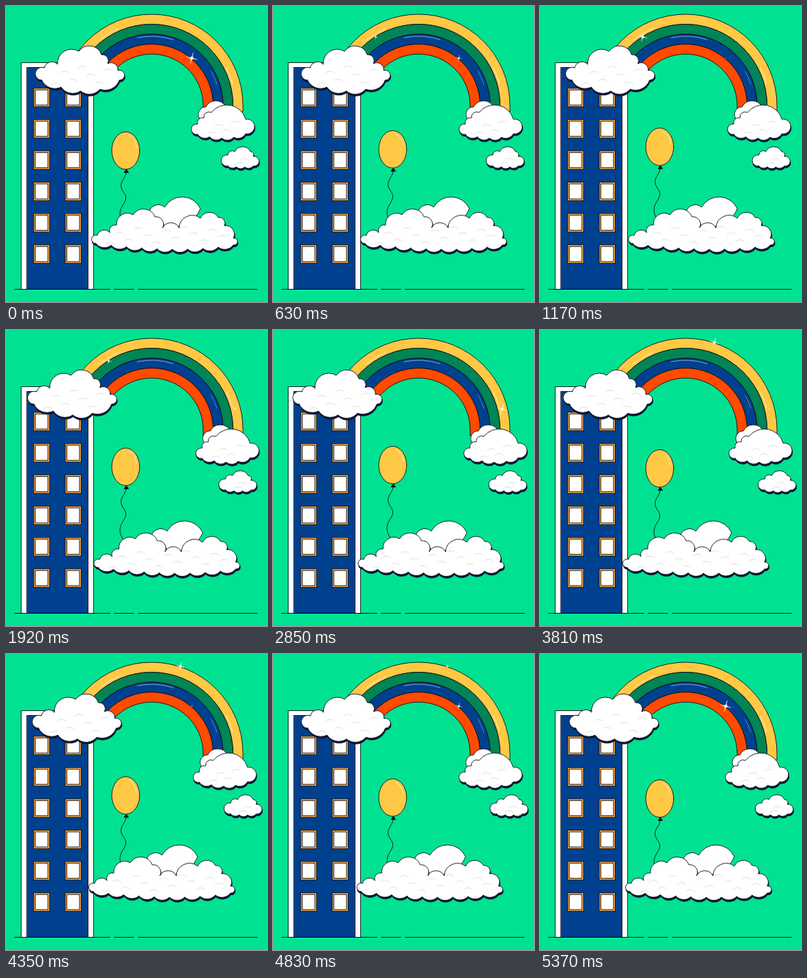
Recreate the animation shown at these times as an HTML page. Size 380 by 431 pixels, loop 5.4 s.

```html
<!DOCTYPE html>
<html lang="en">
<head>
<meta charset="utf-8">
<title>Rainbow and clouds</title>
<style>
html, body { margin: 0; width: 100%; height: 100%; overflow: hidden; background: #00e292; }
svg { display: block; width: 380px; height: 431px; }
</style>
</head>
<body>
<svg id="stage" viewBox="0 0 380 431" fill="none" stroke="#0a0a14" stroke-width=".9" stroke-linecap="round" stroke-linejoin="round"></svg>
<script>
const LOOP = 5400, stage = document.getElementById('stage');
const WHITE = '#fff', NAVY = '#00418f', SHADE = '#0b1836', YELLOW = '#ffc845', SHINE = '#fff2cf';

// Radius / chord of each kind of bump; a negative one goes the longer way round.
const LOBE = .56, TIP = -.51, SCALLOP = .7;

const arcTo = ([x0, y0], [x, y], k) => {
  const r = Math.hypot(x - x0, y - y0) * Math.abs(k);
  return `A${r} ${r} 0 ${k < 0 ? 1 : 0} 1 ${x} ${y}`;
};

// Closed outline of bumps; kind(i) shapes the one that leaves point i.
const puffs = (pts, kind = () => LOBE) => `M${pts[0]}` +
  pts.map((p, i) => arcTo(p, pts[(i + 1) % pts.length], kind(i))).join('') + 'Z';

// The underside sags between the tips, deepest a little right of the middle.
const belly = ([x0, y0], [x1, y1], count, sag) =>
  Array.from({ length: count - 1 }, (_, i) => {
    const u = (i + 1) / count;
    return [x0 + (x1 - x0) * u, y0 + (y1 - y0) * u + sag * Math.sin(Math.PI * u ** .85)];
  });

// Faint arcs scattered evenly inside the cloud.
const creases = (left, right, low, high) => {
  const count = Math.round((right - left) / 16);
  return Array.from({ length: count }, (_, i) => {
    const x = left + 8 + (right - left - 24) * (i + .5) / count;
    const y = low - (low - high) * (.15 + .5 * (i * .618 % 1));
    return `M${x} ${y}` + arcTo([x, y], [x + 12, y + i % 3 - 1], SCALLOP);
  }).join('');
};

// ridge: notches from the left tip over the top to the right tip.
const cloud = ({ id, ridge, scallops, sag, back }) => {
  const first = ridge[0], last = ridge.at(-1), n = ridge.length;
  const d = puffs([...ridge, ...belly(last, first, scallops, sag)],
    i => i === 0 || i === n - 2 ? TIP : i < n - 1 ? LOBE : SCALLOP);
  const high = Math.min(...ridge.map(p => p[1]));
  return `<g id="${id}">${back ? `<path d="${puffs(back)}" fill="${WHITE}"/>` : ''}
    <path d="${d}" fill="${SHADE}" stroke="${SHADE}" transform="translate(.7 2.6)"/>
    <path d="${d}" fill="${WHITE}"/>
    <path d="${creases(first[0], last[0], last[1] + sag, high)}" stroke="#d0d0d6" stroke-width=".7"/></g>`;
};

const rect = (x, y, w, h, fill) =>
  `<rect x="${x}" y="${y}" width="${w}" height="${h}" fill="${fill}"/>`;

const building = () => {
  let s = rect(22.5, 82.5, 105, 330, WHITE) + rect(30.5, 89.5, 89, 323, NAVY);
  for (let row = 0; row < 6; row++)
    for (const x of [40.5, 86.5]) {
      const y = 119.7 + row * 45.6;
      s += rect(x, y, 23, 27, '#ffb04a') + rect(x + 2.5, y + 2.5, 18, 22, WHITE);
    }
  return s;
};

const rainbow = () => {
  const x = 212, y = 145, foot = 154, outer = 133, band = 14.5;
  const bands = [YELLOW, '#008556', NAVY, '#ff4a00'].map((fill, i) => {
    const r = outer - i * band, q = r - band;
    return `<path fill="${fill}" d="M${x - r} ${y}A${r} ${r} 0 0 1 ${x + r} ${y}V${foot}H${x + q}V${y}A${q} ${q} 0 0 0 ${x - q} ${y}Z"/>`;
  }).join('');
  const at = (r, deg) => {
    const a = deg * Math.PI / 180;
    return [x + r * Math.cos(a), y + r * Math.sin(a)];
  };
  const glint = (r, from, to, color) =>
    `<path d="M${at(r, from)}A${r} ${r} 0 0 1 ${at(r, to)}" stroke="${color}"/>`;
  return `<clipPath id="sky"><path d="M60 0H380V160H212V100H60Z"/></clipPath>
    <g clip-path="url(#sky)">${bands}</g>` +
    glint(122, 231, 247, SHINE) + glint(101, 258, 288, '#8fb4ea') +
    glint(122, 333, 345, SHINE) + glint(100, 330, 342, '#5d8bd0');
};

const balloon = `<g id="balloon">
  <path d="M175 241C175 250 167 254 167.5 262S175 273 174.5 280S166 293 166 302S169 312 171 317"/>
  <path d="M175 238L172 242.5H178Z" fill="#0a0a14"/>
  <ellipse cx="174.3" cy="210.5" rx="20.3" ry="27.3" fill="${YELLOW}"/>
  <path d="M178.5 188.5Q188 192 190 206" stroke="${SHINE}"/></g>`;

// Places of the sparkles, in the order they light up.
const sparkles = [[270.5, 76], [149.5, 45], [333.5, 115], [254, 18]];
const beat = LOOP / sparkles.length;
const ray = 'C0-1 1 0 8 0C1 0 0 1 0 8C0 1-1 0-8 0C-1 0 0-1 0-8Z';
const sparkle = `<path class="sparkle" d="M0-8${ray}" fill="${WHITE}" stroke="${WHITE}" stroke-width=".4"/>`;

stage.innerHTML = building() +
  '<path d="M12.5 412.5H151.5M157.5 412.5H186M192.500 412.500H366"/>' +
  rainbow() + sparkle.repeat(sparkles.length) +
  cloud({
    id: 'left', scallops: 4, sag: 16,
    ridge: [[52, 108], [56, 90], [75, 85], [106, 66], [139, 71], [148, 84], [163, 94], [165, 108]]
  }) +
  cloud({
    id: 'right', scallops: 4, sag: 6,
    ridge: [[279, 187], [279, 172], [288, 163], [299, 155], [349, 165], [349, 186]],
    back: [[282, 164], [291, 147], [320, 147], [318, 160]]
  }) +
  cloud({
    id: 'small', scallops: 3, sag: 1.5,
    ridge: [[323, 233], [323, 217], [333, 212], [356, 212], [360, 219], [360, 233]]
  }) +
  balloon +
  cloud({
    id: 'low', scallops: 9, sag: 7,
    ridge: [[131, 346], [133, 334], [151, 330], [161, 319], [185, 304], [217, 307], [228, 323],
      [252, 323], [283, 309], [309, 308], [318, 320], [331, 338], [331, 348]],
    back: [[208, 302], [231, 293], [283, 295]]
  });

const shift = (id, x, y = 0) =>
  document.getElementById(id).setAttribute('transform', `translate(${x} ${y})`);
const sparkleEls = stage.querySelectorAll('.sparkle');

function draw(now) {
  const t = now % LOOP, a = t / LOOP * 2 * Math.PI;
  const c = Math.cos(a) - 1, s = Math.sin(a);
  shift('left', 7 * c);
  shift('right', -4 * c);
  shift('small', -4.4 * s);
  shift('low', 4.3 * s);
  shift('balloon', 0, 7 * c);
  sparkles.forEach(([x, y], i) => {
    const gap = Math.abs(t - i * beat), away = Math.min(gap, LOOP - gap);
    const size = Math.max(0, 1 - away / beat);
    sparkleEls[i].setAttribute('transform', `translate(${x} ${y}) rotate(15) scale(${size})`);
  });
}

const start = performance.now();
(function tick() {
  draw(performance.now() - start);
  requestAnimationFrame(tick);
})();
</script>
</body>
</html>
```
